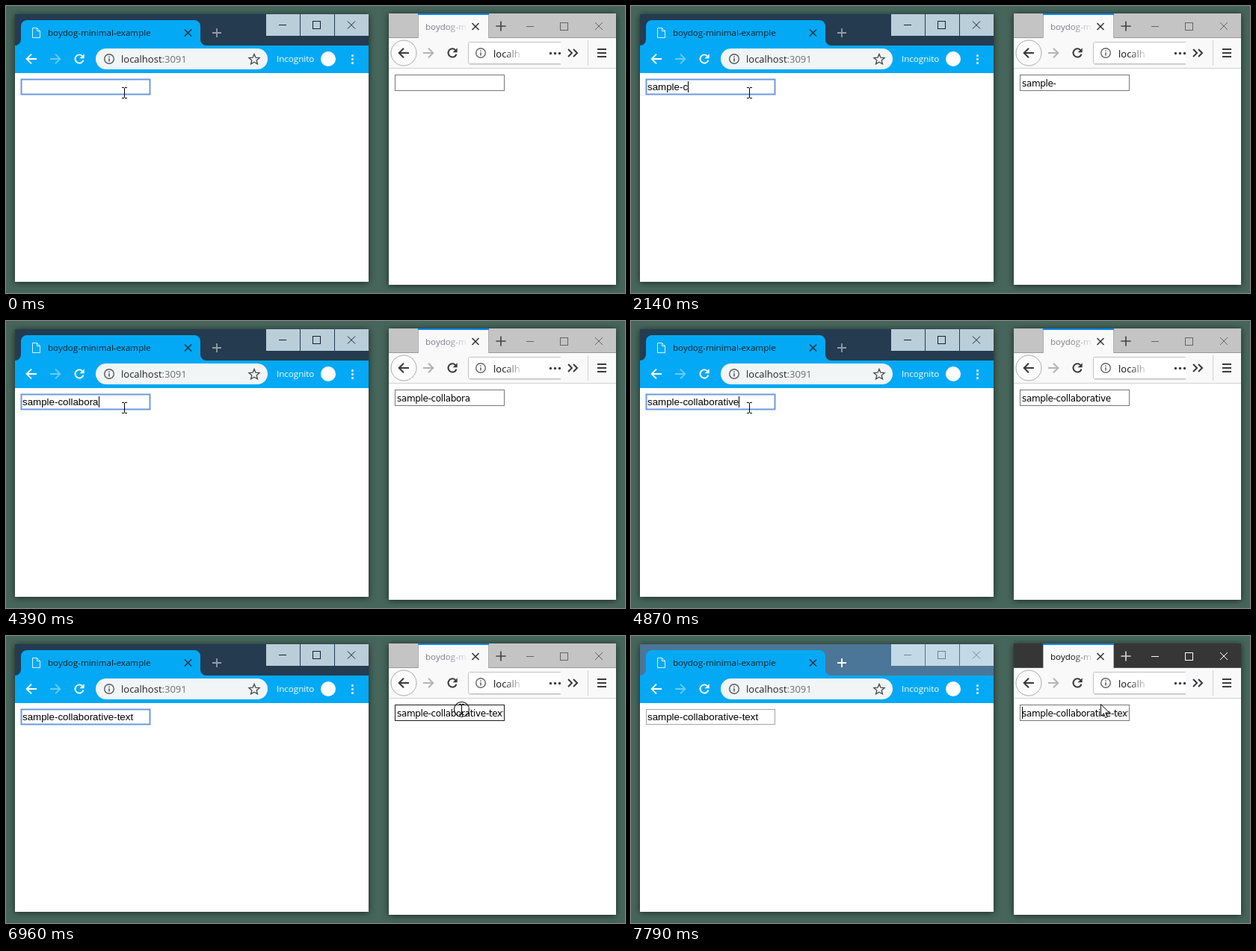
An HTML page that plays this animation: 828x385 px, repeating every 8 s.

```html
<!DOCTYPE html>
<html lang="en">
<head>
<meta charset="utf-8">
<title>Shared text field</title>
<style>
  html, body { margin: 0; width: 100%; height: 100%; overflow: hidden; background: #46655b; }
  svg { display: block; width: 828px; height: 385px; font: 11.6px "Open Sans", sans-serif; white-space: pre; }
  .window { filter: drop-shadow(0 1px 4px #0009); }
  .line { fill: none; stroke: currentColor; }
  .crisp { shape-rendering: crispEdges; }
  .url { font-size: 13px; }
  #leftText { font: 13.333px "Liberation Sans", Arial, sans-serif; }
  #rightText { font: 12px "DejaVu Sans", sans-serif; letter-spacing: -.34px; }

  /* Left window focused; .swap hands the focus to the right one */
  .leftTitle { fill: #243b50; }
  .leftPlus { color: #929da7; }
  .leftButtons { fill: #b9ced9; color: #16222c; }
  .leftField { stroke: #6f99dc; stroke-width: 2; }
  .rightTitle { fill: #c4c4c4; }
  .rightIcons { color: #666; }
  .rightPlus { color: #444; }
  .rightTab { fill: #7d7d86; }
  .rightField { stroke: #777; }
  .hover .rightField { stroke: #1c1c1c; }
  .swap .leftTitle { fill: #4b7698; }
  .swap .leftPlus { color: #fff; }
  .swap .leftButtons { fill: #c3d9e6; color: #75838d; }
  .swap .leftField { stroke: #a4a4a4; stroke-width: 1; }
  .swap .rightTitle { fill: #363636; }
  .swap .rightIcons { color: #fff; }
  .swap .rightPlus { color: #d5d5d5; }
  .swap .rightTab { fill: #0c0c0d; }
</style>
</head>
<body>
<svg id="stage" viewBox="0 0 828 385">
  <defs>
    <g id="info">
      <circle class="line" r="6.3" stroke-width="1.4"/>
      <path class="line" d="M0-3.6V-2M0-.8V3.6" stroke-width="1.6"/>
    </g>
    <path id="back" class="line" d="M7 0H-6M0-6.3L-6.3 0 0 6.3"/>
    <g id="reload">
      <path class="line" d="M4.2-3.9A5.6 5.6 0 1 0 5.5 1.6"/>
      <path d="M6.7-6.8V-.7H.6z" fill="currentColor"/>
    </g>
    <path id="cross" class="line" d="M-4.5-4.5l9 9M4.5-4.5l-9 9"/>
    <path id="plus" class="line" d="M-6 0H6M0-6V6"/>
    <g id="controls" class="line">
      <path class="crisp" d="M-51 .5h10M-5.5-4.5h10v10h-10z"/>
      <path d="M41-4.5l10 10M51-4.5l-10 10"/>
    </g>
    <linearGradient id="tabFade" gradientUnits="userSpaceOnUse" x1="590" x2="620">
      <stop stop-color="#fff"/><stop offset="1"/>
    </linearGradient>
    <linearGradient id="urlFade" gradientUnits="userSpaceOnUse" x1="665" x2="692">
      <stop stop-color="#fff"/><stop offset="1"/>
    </linearGradient>
    <mask id="tabMask" maskUnits="userSpaceOnUse" x="551" y="10" width="80" height="33">
      <path d="M551 10h80v33h-80z" fill="url(#tabFade)"/>
    </mask>
    <mask id="urlMask" maskUnits="userSpaceOnUse" x="640" y="45" width="60" height="36">
      <path d="M640 45h60v36h-60z" fill="url(#urlFade)"/>
    </mask>
    <clipPath id="fieldClip"><path d="M521 93h144v20H521z"/></clipPath>
  </defs>

  <rect width="828" height="385" fill="#46655b"/>

  <g class="window">
    <path d="M12 11h473v359H12z" fill="#fff"/>
    <path class="leftTitle" d="M12 11h473v43H12z"/>
    <path d="M12 53a8 8 0 0 0 8-8V27a8 8 0 0 1 8-8H252a8 8 0 0 1 8 8v18a8 8 0 0 0 8 8H485v37H12z" fill="#03a9f4"/>
  </g>
  <path class="leftButtons crisp" d="M348 11h45v29h-45zM394 11h45v29h-45zM440 11h45v29h-45z"/>
  <use href="#controls" class="leftButtons" x="416" y="25" style="fill:none"/>
  <path d="M35.5 29.5h6l4 4v9h-10zM41.5 29.5v4h4" fill="none" stroke="#d9f2fe"/>
  <text x="56" y="40" fill="#10202b">boydog-minimal-example</text>
  <use href="#cross" x="243.500" y="36" color="#143347" stroke-width="1.6"/>
  <use href="#plus" class="leftPlus" x="282" y="36" stroke-width="1.8"/>
  <g color="#fff" stroke-width="1.9">
    <use href="#back" x="34" y="71"/>
    <use href="#back" transform="translate(66 71) scale(-1 1)" opacity=".4"/>
    <use href="#reload" x="98" y="71"/>
  </g>
  <rect x="120" y="57" width="230" height="28" rx="14" fill="#f2f5f6"/>
  <use href="#info" x="138" y="71" color="#55595d"/>
  <text class="url" x="154" y="75.500" fill="#202124">localhost<tspan fill="#6b6f73">:3091</tspan></text>
  <path d="M332 64.600l2 4.600 5 .4-3.800 3.300 1.200 4.900-4.400-2.600-4.400 2.600 1.200-4.900-3.800-3.300 5-.4z" fill="none" stroke="#4c5054" stroke-width="1.400"/>
  <text x="362" y="75" fill="#fff">Incognito</text>
  <g fill="#fff">
    <circle cx="431" cy="71" r="10"/>
    <circle cx="463.500" cy="66.500" r="1.500"/>
    <circle cx="463.500" cy="71.500" r="1.500"/>
    <circle cx="463.500" cy="76.500" r="1.500"/>
  </g>
  <rect class="leftField" x="20.500" y="98.500" width="172" height="20" fill="#fff"/>
  <text id="leftText" x="22" y="113"></text>

  <g class="window">
    <path d="M512 10h304v364H512z" fill="#fff"/>
    <path class="rightTitle" d="M512 10h304v33H512z"/>
  </g>
  <path d="M512 43h304v40H512zM551 10h95v33h-95z" fill="#f9f9fa"/>
  <path class="crisp" d="M551.500 10v33M645.500 10v33M512 42.500h39M646 42.500h170" stroke="#777" stroke-opacity=".55"/>
  <path d="M551 10h95v2h-95z" fill="#0a84ff"/>
  <path class="crisp" d="M512 83.500h304M778.500 46v34" stroke="#d2d2d2"/>
  <text class="rightTab" x="561" y="32" mask="url(#tabMask)">boydog-m</text>
  <use href="#cross" x="628" y="27.500" color="#333" stroke-width="1.500"/>
  <use href="#plus" class="rightPlus" transform="translate(662 27) scale(1.100)" stroke-width="1.500"/>
  <use href="#controls" class="rightIcons" x="747" y="26.500"/>
  <circle cx="532" cy="63" r="17" fill="#fcfcfc" stroke="#aaa"/>
  <g color="#3a3a3c" stroke-width="2">
    <use href="#back" x="532" y="63"/>
    <use href="#back" transform="translate(565 63) scale(-1 1)" color="#b4b4b4"/>
    <use href="#reload" x="597" y="63"/>
    <path d="M742 78.500H620" stroke="#0002" stroke-width="1"/>
    <path d="M742 48.500H620.500a2 2 0 0 0-2 2v25a2 2 0 0 0 2 2H742" fill="#fff" stroke="#c2c2c4" stroke-width="1"/>
    <use href="#info" x="635" y="63" color="#666"/>
    <text class="url" x="652" y="68.500" fill="#0c0c0d" mask="url(#urlMask)">localh</text>
    <g fill="currentColor" stroke="none">
      <circle cx="728.500" cy="63.500" r="1.700"/>
      <circle cx="734.500" cy="63.500" r="1.700"/>
      <circle cx="740.500" cy="63.500" r="1.700"/>
    </g>
    <path class="line" d="M752 58l5 5-5 5M759 58l5 5-5 5"/>
    <path class="line crisp" d="M791 58h12M791 63h12M791 68h12"/>
  </g>
  <rect class="rightField crisp" x="520.500" y="92.500" width="146" height="21" fill="#fff"/>
  <text id="rightText" x="523" y="108" clip-path="url(#fieldClip)"></text>

  <rect id="leftCaret" class="crisp" y="101" width="1" height="15"/>
  <rect id="rightCaret" class="crisp" y="95" width="1" height="16"/>
  <circle id="click" cx="609.500" cy="98.500" r="10" fill="none" stroke="#222" stroke-width="1.200"/>
  <path id="beam" class="line crisp" d="M-3 .5h3M1 .5h3M.5 1v13M-3 14.500h3M1 14.500h3" stroke="#222"/>
  <path id="arrow" d="M.5.5v16l3.700-3.600 2.500 5.700 2.500-1-2.500-5.600h5z" fill="#fff" stroke="#111"/>
</svg>
<script>
const LOOP = 8000;
const PHRASE = "sample-collaborative-text";

// [ms, letters in the left field, letters synced to the right field]
const typing = [
  [0, 0, 0], [520, 1, 1], [830, 2, 2], [950, 3, 3], [1070, 4, 4], [1190, 5, 5], [1340, 6, 6],
  [1870, 7, 6], [1990, 7, 7], [2140, 8, 7], [2260, 9, 9], [2530, 11, 10], [2650, 12, 11], [2800, 12, 12],
  [3600, 13, 13], [3720, 14, 13], [3840, 14, 14], [4240, 15, 15],
  [4390, 16, 16], [4510, 17, 17], [4630, 18, 18], [4750, 19, 19], [4870, 20, 20],
  [5300, 21, 20], [5420, 21, 21], [5570, 23, 22], [5720, 23, 23], [6300, 24, 24], [6420, 25, 25]
];
const pointer = [
  [0, "beam", 158, 109], [6420, "arrow", 622, 124], [6570, "arrow", 690, 124],
  [6690, "arrow", 724, 124], [6840, "beam", 609, 91], [7210, "arrow", 628, 91]
];
const FOCUS_SWAP = 7090;

const $ = id => document.getElementById(id);
const show = (id, on) => $(id).style.display = on ? "" : "none";
const within = (t, from, to) => t >= from && t < to;
const current = (steps, t) => steps.findLast(step => step[0] <= t);

function draw(t) {
  const [, left, right] = current(typing, t);
  $("leftText").textContent = PHRASE.slice(0, left);
  $("rightText").textContent = PHRASE.slice(0, right);

  const textWidth = left ? $("leftText").getComputedTextLength() : 0;
  $("leftCaret").setAttribute("x", Math.round(22 + textWidth));
  show("leftCaret", within(t, 120, 3170) || within(t, 3600, 6150) || within(t, 6300, 6840));
  $("rightCaret").setAttribute("x", t < 7790 ? 609 : 523);
  show("rightCaret", within(t, FOCUS_SWAP, 7640) || t >= 7790);

  const [, shape, x, y] = current(pointer, t);
  $(shape).setAttribute("transform", `translate(${x} ${y})`);
  show("beam", shape === "beam");
  show("arrow", shape === "arrow");
  show("click", within(t, 6960, FOCUS_SWAP));

  $("stage").classList.toggle("hover", within(t, 6840, 7210));
  $("stage").classList.toggle("swap", t >= FOCUS_SWAP);
}

function tick() {
  draw(performance.now() % LOOP);
  requestAnimationFrame(tick);
}
tick();
</script>
</body>
</html>
```
